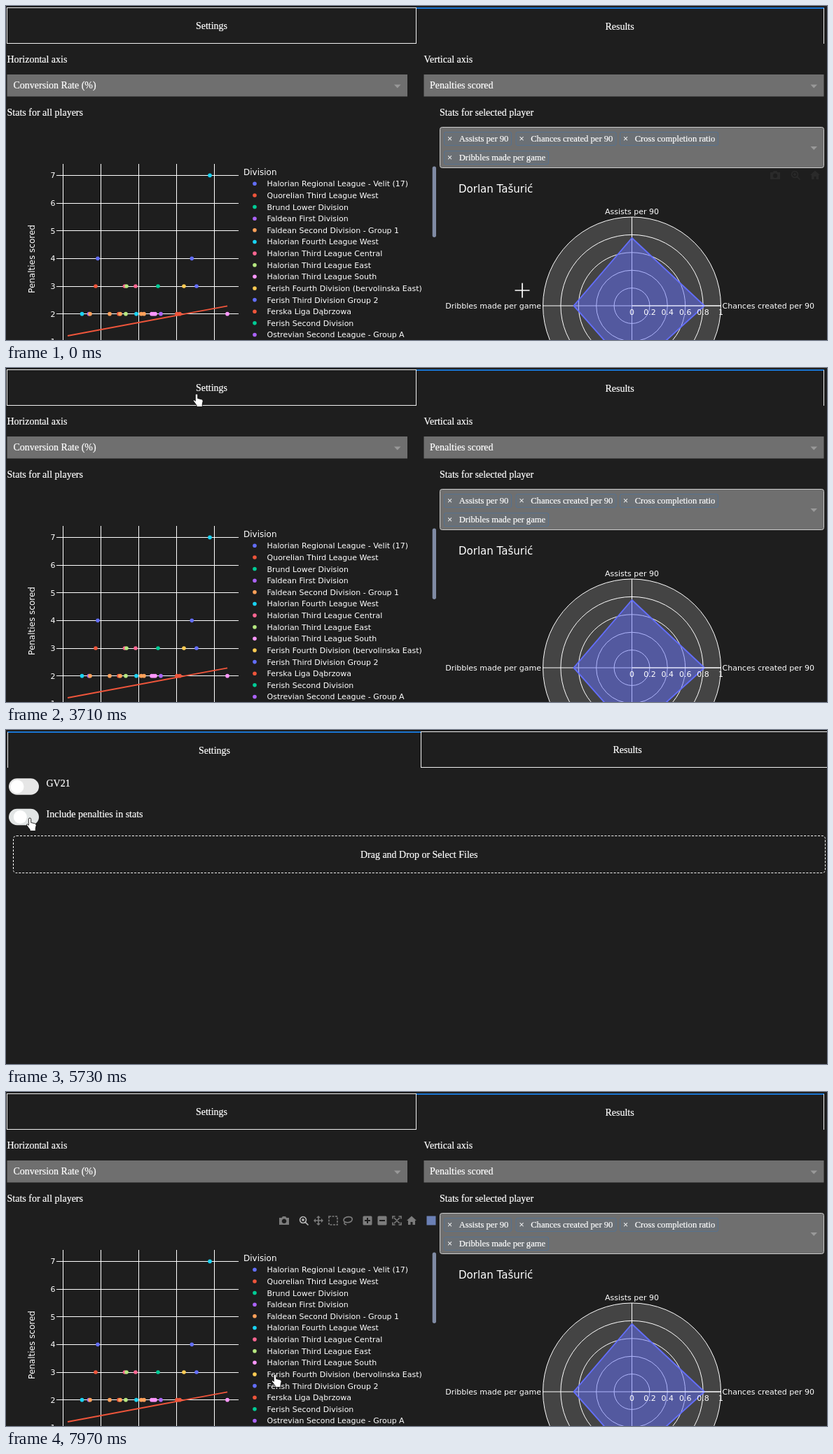
An HTML page for the animation above (8000 ms loop, 1172 px wide and 478 px high).

```html
<!DOCTYPE html>
<html lang="en">
<head>
<meta charset="utf-8">
<title>Player stats dashboard</title>
<style>
  html, body { margin: 0; width: 100%; height: 100%; overflow: hidden; background: #1e1e1e; }
  svg { display: block; width: 1172px; height: 478px; }
  text { fill: #fff; stroke: #fff; stroke-width: .2; font: 14px "Liberation Serif", serif; white-space: pre; }
  .chip text { font-size: 12.6px; }
  .chip rect { fill: rgba(0,126,255,.04); stroke: rgba(0,126,255,.2); }
  .plot text { stroke: none; font: 11px "DejaVu Sans", sans-serif; }
  .plot text.title { font-size: 12px; }
  .plot text.name { font-size: 15px; }
  .tip text { stroke: none; font: 11.3px "Liberation Sans", sans-serif; }
  .tip text.bold { font-weight: bold; font-size: 11.5px; }
  .mid { text-anchor: middle; }
  .end { text-anchor: end; }
  .line { fill: none; stroke: #fff; }
  .grid { shape-rendering: crispEdges; }
  .border { fill: none; stroke: #f0f0f0; }
  .blue { fill: #1975d2; }
  .field { fill: #6f6f6f; }
  .caret { fill: #999; }
  .dropzone { box-sizing: border-box; height: 54px; border: 1px dashed #fff; border-radius: 5px; }
  .icon { fill: #7c7c7c; }
  .icon .o { fill: none; stroke: #7c7c7c; stroke-width: 1.6; }
  .pointer { fill: #fff; stroke: #000; stroke-width: .8; }
</style>
</head>
<body>
<svg viewBox="0 0 1172 478">
  <g id="results">
    <rect class="border" x="1.5" y="2.5" width="584" height="51"/>
    <rect class="blue" x="586" y="2" width="582" height="2"/>
    <path class="border" d="M1167.5 3V54"/>
    <text class="mid" x="293.5" y="33">Settings</text>
    <text class="mid" x="876" y="34">Results</text>
    <text x="1.5" y="81">Horizontal axis</text>
    <text x="596.5" y="81">Vertical axis</text>
    <rect class="field" x="1.5" y="98" width="571.5" height="31.5"/>
    <rect class="field" x="596.5" y="98" width="571" height="31.5"/>
    <text x="10.5" y="118">Conversion Rate (%)</text>
    <text x="605" y="118">Penalties scored</text>
    <text x="1.5" y="157">Stats for all players</text>
    <text x="619" y="157">Stats for selected player</text>
    <g id="narrow" class="plot"></g>
    <g id="wide" class="plot"></g>
    <rect class="field" x="619.5" y="173.5" width="548" height="58" rx="3" style="stroke:#ccc"/>
    <path class="caret" d="M554 112.5h9.5l-4.75 5zM1148.5 112.5h9.5l-4.75 5zM1148.5 201h9.5l-4.75 5z"/>
    <g id="chips" class="chip"></g>
    <g id="radar" class="plot"></g>
    <g id="ghostBar" class="icon" opacity=".13"></g>
    <g id="modebar" class="icon"></g>
    <g id="tip" class="tip">
      <path d="M266 361.5l6.5-6V321.5h204.5v80H272.5V367.5z" fill="#636efa" stroke="#ddd" stroke-width=".8"/>
      <text class="bold" x="276" y="336">Dorlan Tašurić</text>
      <text x="275.5" y="366">Division=Nedrian Second League East</text>
      <text x="275.5" y="380">Conversion Rate (%)=0.2197802</text>
      <text x="275.5" y="395">Penalties scored=4</text>
    </g>
  </g>

  <g id="settings">
    <rect class="blue" x="2" y="2" width="590" height="2"/>
    <path class="border" d="M2.5 3V54"/>
    <rect class="border" x="592.5" y="2.5" width="590" height="51"/>
    <text class="mid" x="297.5" y="34">Settings</text>
    <text class="mid" x="887" y="33">Results</text>
    <rect x="4" y="69.2" width="43" height="23.5" rx="11.75" fill="#e6e6e6"/>
    <circle cx="16" cy="81" r="9.5" fill="#fff"/>
    <rect id="track" x="4" y="112.8" width="43" height="23.5" rx="11.75"/>
    <circle id="knob" cy="124.5" r="9.5" fill="#fff"/>
    <text x="57.5" y="81">GV21</text>
    <text x="57.5" y="125">Include penalties in stats</text>
    <foreignObject x="10" y="151" width="1160" height="54"><div class="dropzone"></div></foreignObject>
    <text class="mid" x="589.7" y="183">Drag and Drop or Select Files</text>
  </g>

  <g id="cursor">
    <path id="cross" d="M-10.5 0H10.5M0-10.5V10.5" stroke="#fff" stroke-width="1.7"/>
    <path id="arrow" class="pointer" d="M0 0V15l3.5-3.3 2.3 5.3 2.4-1-2.3-5.2H11z"/>
    <path id="hand" class="pointer" d="M-1.7 1.7a1.7 1.7 0 0 1 3.4 0V6.5l5.5 1.3q2 .5 2 2.5l-1 4.7v3.5h-8v-2l-4.5-6q-.8-1.8 1-1.8l1.6 1.6z"/>
  </g>
</svg>

<script>
const $ = id => document.getElementById(id);
const text = (x, y, s, cls = '') => `<text x="${x}" y="${y}" class="${cls}">${s}</text>`;
const dot = (x, y, color) => `<circle cx="${x}" cy="${y}" r="2.8" fill="${color}"/>`;

const palette = ['#636efa', '#ef553b', '#00cc96', '#ab63fa', '#ffa15a',
                 '#19d3f3', '#ff6692', '#b6e880', '#ff97ff', '#fecb52'];
const divisions = [
  'Halorian Regional League - Velit (17)', 'Quorelian Third League West',
  'Brund Lower Division', 'Faldean First Division', 'Faldean Second Division - Group 1',
  'Halorian Fourth League West', 'Halorian Third League Central',
  'Halorian Third League East', 'Halorian Third League South',
  'Ferish Fourth Division (bervolinska East)', 'Ferish Third Division Group 2',
  'Ferska Liga Dąbrzowa', 'Ferish Second Division', 'Ostrevian Second League - Group A'
];
// penalties scored: [x, palette index] pairs
const points = {
  7: [[291, 5]],
  4: [[131, 0], [265.3, 0]],
  3: [[128, 1], [169.5, 6], [172, 7], [185, 6], [217, 2], [254, 9], [272, 0]],
  2: [[108.5, 5], [118.5, 3], [120, 4], [148, 4], [161, 1], [163, 4], [171, 7], [186, 5],
      [193, 4], [197, 4], [208, 8], [210.5, 8], [213, 8], [221, 3], [244, 1], [248, 1], [316, 8]]
};
const rowY = v => 242.4 + (7 - v) * 39.65;

function scatter(origin, scale, shift) {
  const px = x => origin + (x - 81.5) * scale;
  let out = '', grid = '';
  for (let i = 0; i < 5; i++) grid += `M${px(81.5 + i * 54.1)} 226V478`;
  for (let v = 1; v <= 7; v++) {
    grid += `M72 ${rowY(v)}H${332 + shift}`;
    out += text(70.5, rowY(v) + 4, v, 'end');
  }
  out += `<path class="line grid" d="${grid}"/>`;
  for (const v in points)
    for (const [x, c] of points[v]) out += dot(px(x), rowY(v), palette[c]);
  out += `<path d="M${px(88)} 472L${px(316)} 429.3" stroke="#ef553b" stroke-width="1.8"/>`;
  out += `<g transform="translate(40.5 362)rotate(-90)">${text(0, 0, 'Penalties scored', 'mid title')}</g>`;
  out += text(339 + shift, 242, 'Division', 'title');
  divisions.forEach((name, i) => {
    const y = 254.3 + i * 16.63;
    out += dot(355 + shift, y, palette[i % 10]) + text(372.5 + shift, y + 4, name);
  });
  return out;
}
const scrollbar = (x, w) => `<rect x="${x}" y="229.5" width="${w}" height="101.5" rx="${w / 2}" fill="#808ba4"/>`;
$('narrow').innerHTML = scatter(81.5, 1, 0) + scrollbar(608.7, 5.3);
$('wide').innerHTML = scatter(82.5, 1.0277, 8) + scrollbar(616.8, 2);

$('chips').innerHTML = [
  [633.5, 190, 'Assists per 90', 71], [736, 190, 'Chances created per 90', 118],
  [884.5, 190, 'Cross completion ratio', 115], [633.5, 217, 'Dribbles made per game', 124]
].map(([x, y, label, w]) =>
  `<rect x="${x - 8}" y="${y - 9.5}" width="${w + 25}" height="19" rx="2"/>` +
  text(x, y + 3.5, '×', 'mid') + text(x + 13.2, y + 4.2, label)).join('');

function radar() {
  const cx = 893.5, cy = 429, r = 127;
  let out = `<circle cx="${cx}" cy="${cy}" r="${r}" fill="#444"/>`;
  for (let i = 1; i <= 5; i++)
    out += `<circle class="line" cx="${cx}" cy="${cy}" r="${r * i / 5}"/>`;
  out += `<path class="line" d="M${cx} ${cy - r}V478M${cx - r} ${cy}H${cx + r}"/>
    <path d="M${cx} 332L997 ${cy}L${cx} 523L810.5 ${cy}z" fill="#636efa" fill-opacity=".5" stroke="#636efa" stroke-width="1.9"/>
    <path class="line" d="M${cx} ${cy}h${r}"/>`;
  for (let i = 0; i <= 5; i++) out += text(cx + r * i / 5, 442, i / 5, 'mid');
  return out + text(cx, 298, 'Assists per 90', 'mid') +
    text(1022.5, 432.5, 'Chances created per 90') +
    text(764, 432.5, 'Dribbles made per game', 'end') +
    text(646, 267, 'Dorlan Tašurić', 'name');
}
$('radar').innerHTML = radar();

const place = (x, y, shape) => `<g transform="translate(${x} ${y})">${shape}</g>`;
const camera = '<path fill-rule="evenodd" d="M-7-4h3.5l1.5-2h4l1.5 2H7V6H-7zM0-2.5a3.3 3.3 0 1 0 .1 0z"/>';
const zoom = '<path class="o" d="M1.5 1.5l5 5M-1-5.5a4.5 4.5 0 1 0 .1 0M-3-1h4M-1-3v4"/>';
const pan = '<path class="o" d="M-6 0H6M0-6V6"/><path d="M-7 0l3-3v6zM7 0l-3-3v6zM0-7l3 3h-6zM0 7l3-3h-6z"/>';
const select = '<rect class="o" x="-6" y="-6" width="12" height="12" stroke-dasharray="3 1.5"/>';
const lasso = '<path class="o" d="M-4 3Q-8-1-4-4Q0-6 4-5Q8-3 5 1Q1 4-4 2Q-7 5-2 6"/>';
const sign = d => `<rect x="-6.5" y="-6.5" width="13" height="13" rx="1.5"/><path d="${d}" stroke="#1e1e1e" stroke-width="2"/>`;
const autoscale = '<path class="o" d="M-6-2.5V-6h3.5M2.5-6H6v3.5M6 2.5V6H2.5M-2.5 6H-6V2.5M-4-4L4 4M4-4L-4 4"/>';
const home = '<path d="M0-6.5L7 0H5V6H1.5V2h-3v4H-5V0h-2z"/>';
$('modebar').innerHTML = place(397, 184, camera) +
  place(425, 184, `<g style="filter:brightness(1.5)">${zoom}</g>`) +
  place(446, 184, pan) + place(467, 184, select) + place(488, 184, lasso) +
  place(516, 184, sign('M-4 0H4M0-4V4')) + place(537, 184, sign('M-4 0H4')) +
  place(558, 184, autoscale) + place(579, 184, home) +
  '<rect x="600.5" y="177.5" width="13" height="13" fill="#6b80b5"/>';
$('ghostBar').innerHTML = place(1098, 242, camera) + place(1127, 242, zoom) + place(1155, 242, home);

// cursor moves: start, end, steps, x, y
const moves = [
  [70, 620, 8, 272, 366], [1080, 1150, 2, 266, 366], [2820, 2820, 1, 271, 325],
  [2890, 2960, 2, 276, 18], [3170, 3640, 7, 272, 37], [4360, 4920, 9, 29, 134],
  [5120, 5260, 3, 34, 126], [5800, 6000, 4, 854, 42], [6220, 6350, 3, 867, 33],
  [6690, 6750, 2, 870, 24], [7210, 7210, 1, 870, 33], [7540, 7970, 7, 384, 404]
];
const smooth = p => p * p * (3 - 2 * p);
const clamp = p => Math.max(0, Math.min(1, p));

function cursorAt(t) {
  let x = 737, y = 407;
  for (const [start, end, steps, toX, toY] of moves) {
    if (t < start) break;
    const step = end > start ? Math.floor((t - start) / (end - start) * (steps - 1) + 1e-6) : 0;
    const p = smooth(clamp((step + 1) / steps));
    x += (toX - x) * p;
    y += (toY - y) * p;
  }
  return [x, y];
}

function cursorKind(x, y, inSettings) {
  if (y < 54) return 'hand';
  if (inSettings) return x < 48 && y > 110 && y < 138 ? 'hand' : 'arrow';
  if (y > 226 && x > 81 && x < 333 || y > 290 && x > 640) return 'cross';
  return y > 245 && x > 340 && x < 600 ? 'hand' : 'arrow';
}

const show = (id, on) => $(id).style.display = on ? '' : 'none';

function draw(t) {
  const inSettings = t >= 3770 && t < 7210;
  const isWide = t >= 7210 && t < 7540;
  show('settings', inSettings);
  show('results', !inSettings);
  show('wide', isWide);
  show('narrow', !isWide);
  show('ghostBar', t < 70);
  show('tip', t >= 540 && t < 2890);
  $('modebar').style.opacity = t < 3500
    ? clamp((t - 220) / 250) * clamp((3240 - t) / 300)
    : clamp((t - 7670) / 250);

  const on = smooth(clamp((t - 5640) / 300));
  const tint = on * on;
  $('knob').setAttribute('cx', 16 + 19.5 * on);
  $('track').setAttribute('fill', `rgb(${230 - 90 * tint},${230 - 30 * tint},${230 - 20 * tint})`);

  const [x, y] = cursorAt(t);
  const kind = cursorKind(x, y, inSettings);
  for (const id of ['cross', 'arrow', 'hand']) show(id, id === kind);
  $('cursor').setAttribute('transform', `translate(${x} ${y})`);
}

const begin = performance.now();
function tick() {
  draw((performance.now() - begin) % 8000);
  requestAnimationFrame(tick);
}
tick();
</script>
</body>
</html>
```
